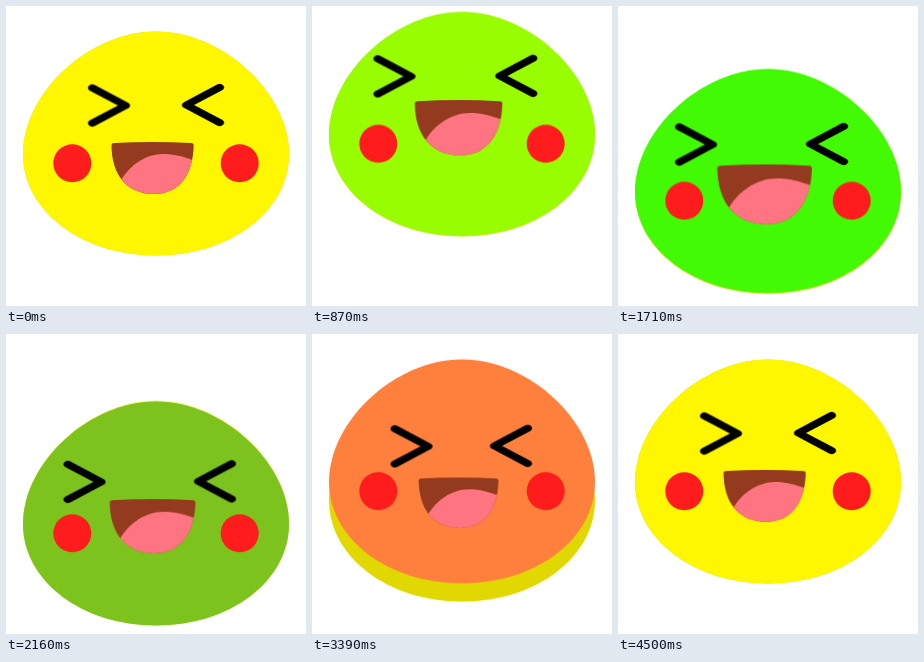
Write an HTML page that moves like this. It is 300 px wide and 300 px high and loops after 4530 ms.

```html
<!DOCTYPE html>
<html lang="en">
<head>
<meta charset="utf-8">
<title>Bouncing face</title>
<style>
  html, body { margin: 0; width: 100%; height: 100%; overflow: hidden; background: #fff; }
  svg { display: block; width: 100%; height: 100%; }

  .bounce, #skin, #left, #right, #mouth { animation: 4530ms ease-in-out infinite; }
  .bounce { animation-name: bounce; }
  #skin { animation-name: tint; animation-timing-function: linear; }
  #left { animation-name: left; }
  #right { animation-name: right; }
  #mouth { animation-name: mouth; transform-origin: 146.6px 162px; }

  /* The shade repeats the bounce 90 ms late. */
  #shade { animation-delay: -4440ms; }

  @keyframes bounce {
    0% { transform: translateY(0); animation-timing-function: ease-out; }
    10.6% { transform: translateY(-10.5px); }
    18.8% { transform: translateY(-20px); }
    25.8% { transform: translateY(42px); }
    41% { transform: translateY(37px); }
    47% { transform: translateY(42px); }
    57.6%, 69.5% { transform: translateY(45.5px); animation-timing-function: cubic-bezier(.3, .1, .75, .8); }
    74.8% { transform: translateY(0); animation-timing-function: ease-out; }
    87.4% { transform: translateY(-22px); }
    97.4%, 100% { transform: translateY(0); }
  }
  @keyframes tint {
    0%, 99.3%, 100% { fill: #fff700; }
    10.6% { fill: #c8fb00; }
    25.8% { fill: #73ff00; }
    39% { fill: #3cfa04; }
    57.6% { fill: #c68439; }
    74.8% { fill: #ff803c; }
  }
  @keyframes left {
    0%, 99.3%, 100% { transform: none; }
    10.6% { transform: translate(-13.5px, -25px); }
    25.8% { transform: translate(-25px, 0); }
    37.7% { transform: translate(-25px, 1.5px); }
    57.6% { transform: translate(-24px, 11px); }
    74.8% { transform: translate(-3.5px, 13px); }
  }
  @keyframes right {
    0%, 99.3%, 100% { transform: none; }
    10.6% { transform: translate(0, -25px); }
    25.8% { transform: translate(12px, 0); }
    37.7% { transform: translate(12px, 1.5px); }
    57.6% { transform: translate(12px, 11px); }
    74.8% { transform: translate(2px, 13px); }
  }
  @keyframes mouth {
    0%, 99.3%, 100% { transform: none; }
    10.6% { transform: translateY(-32px) scale(1.08); }
    25.8% { transform: translateY(-13.5px) scale(1.055); }
    37.7% { transform: translateY(-11px) scale(1.15); }
    57.6% { transform: translateY(-12.5px) scale(.935); }
    74.8% { transform: translateY(7px) scale(.97); }
  }
</style>
</head>
<body>
<svg viewBox="0 0 300 300">
  <defs>
    <path id="egg" d="M150 25.500C217 25.500 283 87 283 148C283 205 224 249.500 150 249.500S17 205 17 148C17 87 83 25.500 150 25.500Z"/>
    <path id="lips" d="M105.500 139Q105.500 137.200 108 137Q147 134.800 185 137Q187.700 137.200 187.700 139C187 169 173 188 148 188C121 188 105.500 169 105.500 139Z"/>
    <path id="chevron" d="M-13 -17.600L13 0L-13 17.600" fill="none" stroke="#000" stroke-width="6.900" stroke-linecap="round" stroke-linejoin="round"/>
    <clipPath id="inside"><use href="#lips"/></clipPath>
  </defs>
  <use id="shade" class="bounce" href="#egg" fill="#e0d800"/>
  <g class="bounce">
    <use id="skin" href="#egg"/>
    <g fill="#ff1c1c">
      <circle cx="66.300" cy="157.300" r="19"/>
      <circle cx="233.700" cy="157.300" r="19"/>
    </g>
    <g id="mouth">
      <use href="#lips" fill="#943a1f"/>
      <path clip-path="url(#inside)" fill="#ff7481" d="M111 182C121 159 140 148 157 148C168 148 178 150.500 190 155.500V192H111Z"/>
    </g>
    <g id="left"><use href="#chevron" transform="translate(103 99.500) scale(1.280 1)"/></g>
    <g id="right"><use href="#chevron" transform="translate(197 99) scale(-1.280 1)"/></g>
  </g>
</svg>
</body>
</html>
```
